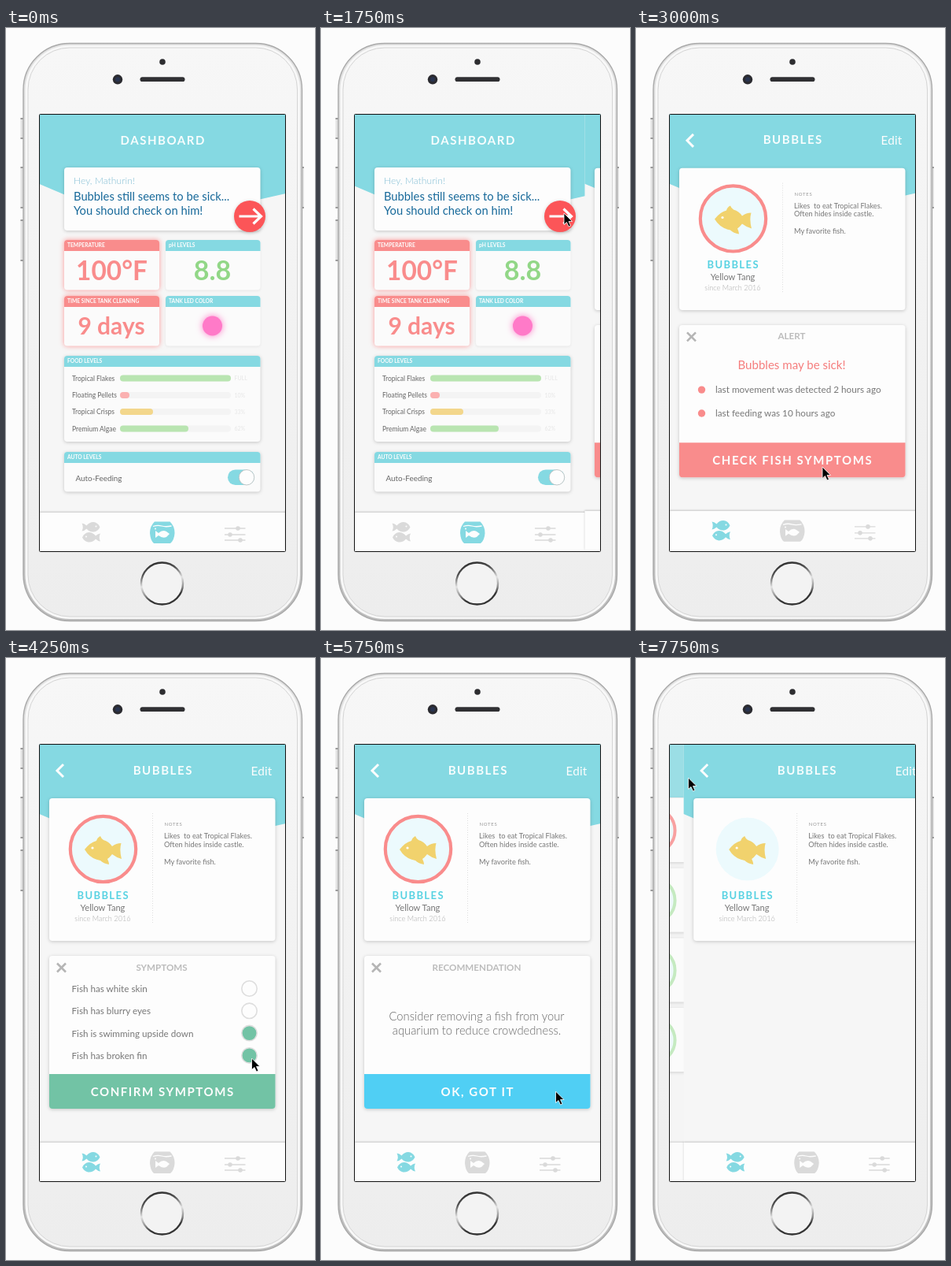
An HTML page that plays this animation: 393x764 px, repeating every 8000 ms.

```html
<!DOCTYPE html>
<html lang="en">
<head>
<meta charset="utf-8">
<title>Aquarium app</title>
<style>
  html, body { margin: 0; width: 100%; height: 100%; overflow: hidden; background: #fcfcfc; }
  svg { display: block; width: 393px; height: 764px; }
  text { font-family: Lato, sans-serif; white-space: pre; }
  .card { filter: drop-shadow(0 1.5px 2px #0003); }
  .soft { filter: drop-shadow(0 1px 1.5px #0001); }
  .alarm { filter: drop-shadow(0 0 3px #ff6b6bb0); }
  .glow { filter: drop-shadow(0 0 4px #ff7ac8); }
</style>
</head>
<body>
<svg id="stage" viewBox="0 0 393 764"></svg>
<script>
const TEAL = '#85d9e2', RED = '#f98c8c', GREEN = '#72c3a5', BLUE = '#50cff4';
const WHITE = '#fdfdfd', PAGE = '#f6f6f6', GREY = '#777';
const LOOP = 8000, STEP = 250, SCREEN_W = 313;

// --- drawing helpers -------------------------------------------------
const rect = (x, y, w, h, fill, extra = '') =>
  `<rect x="${x}" y="${y}" width="${w}" height="${h}" fill="${fill}" ${extra}/>`;
const circle = (x, y, r, fill, extra = '') =>
  `<circle cx="${x}" cy="${y}" r="${r}" fill="${fill}" ${extra}/>`;
const line = (d, color, width, extra = '') =>
  `<path d="${d}" fill="none" stroke="${color}" stroke-width="${width}" ${extra}/>`;
const shape = (d, fill, extra = '') => `<path d="${d}" fill="${fill}" ${extra}/>`;
const group = (content, extra = '') => `<g ${extra}>${content}</g>`;
const label = (x, y, size, str, fill = GREY, weight = 400, spacing = 0, anchor = 'start') =>
  `<text x="${x}" y="${y}" font-size="${size}" fill="${fill}" font-weight="${weight}"
    letter-spacing="${spacing}" text-anchor="${anchor}">${str}</text>`;
const centered = (x, y, size, str, fill, weight, spacing = 0) =>
  label(x + spacing / 2, y, size, str, fill, weight, spacing, 'middle');
const topRounded = (x, y, w, h, fill) =>
  shape(`M${x} ${y + h}v${4 - h}q0-4 4-4h${w - 8}q4 0 4 4v${h - 4}z`, fill);

// --- shared page parts -----------------------------------------------
const WAVE = 'M42.500 109H356V210L170 252L42.500 198z', FLAT = 'M42.500 109H356V177H42.500z';
const pageBase = (title, header = WAVE) =>
  rect(42.5, 109, 314, 556, PAGE) + shape(header, TEAL) +
  centered(199, 147.5, 15, title, '#f7fdfd', 700, 1.55);

function tabs(active) {
  const tint = i => i === active ? TEAL : '#dadada';
  const smallFish = shape('M-11.500-5Q-8-4.500-5.500-2Q-2-6.500 3-6.500Q9-6 11.500 0Q9 5 4 6Q-2 6.500-5.500 2Q-8 4.500-11.500 5Q-9 0-11.500-5z', tint(0)) +
    circle(6.5, -1, 1, WHITE);
  const bowl = shape('M189 626.500H208.500Q214.500 632 214.500 641Q214 650 209 654H188Q183.500 650 183 641Q183 632 189 626.500z', tint(1)) +
    line('M187 632.500Q193 630.500 198 632T210.500 632', WHITE, 1.3) +
    shape('M190 638L194 641Q199 636 204 639L208 642L204 646Q199 648 194 644L190 647z', WHITE) +
    circle(190, 635.5, 1, WHITE);
  const sliders = [[635, 295], [643, 285], [650, 298]].map(([y, x]) =>
    line(`M278 ${y}H304.500`, tint(2), 1.4) + circle(x, y, 2.8, tint(2))).join('');
  return rect(42.5, 615, 314, 50, WHITE, 'style="filter:drop-shadow(0 -1px 1px #0003)"') +
    group(smallFish, 'transform="translate(108 633.500)"') +
    group(smallFish, 'transform="translate(108.500 646.500) scale(-1 1)"') + bowl + sliders;
}

// --- dashboard ---------------------------------------------------------
function tile(x, y, w, h, title, color, kind) {
  return group(rect(x, y, w, h, '#fbfbfb', 'rx="4"') + topRounded(x, y, w, 14, color), `class="${kind}"`) +
    label(x + 4, y + 9.2, 6.7, title, WHITE, 700);
}

function foodBar(name, y, width, color, amount) {
  return label(84, y + 3, 8.5, name, '#666') +
    rect(145, y - 4, 141, 8, '#f4f4f4', 'rx="4"') + rect(145, y - 4, width, 8, color, 'rx="4"') +
    label(290.5, y + 2.5, 7, amount, '#e6e6e6');
}

const dashboard = pageBase('DASHBOARD') +
  rect(74, 177, 249.5, 80, WHITE, 'rx="4" class="card"') +
  label(86, 198, 12, 'Hey, Mathurin!', '#7fbcd3', 300, 0.1) +
  label(86, 218.5, 14.75, 'Bubbles still seems to be sick...', '#17699a') +
  label(86, 236.5, 14.75, 'You should check on him!', '#17699a') +
  circle(310, 239, 20, '#fc5558', 'class="card"') +
  line('M296.500 239H324M314.500 229.500L324.500 239L314.500 248.500', WHITE, 3.2) +
  tile(74, 269, 121, 63.5, 'TEMPERATURE', RED, 'alarm') +
  centered(134.5, 320, 33.4, '100°F', RED, 700) +
  tile(203, 269, 120.5, 63.5, 'pH LEVELS', TEAL, 'soft') +
  centered(262.5, 320, 34, '8.8', '#92d787', 700) +
  tile(74, 340, 121, 63.5, 'TIME SINCE TANK CLEANING', RED, 'alarm') +
  centered(134, 389, 30, '9 days', RED, 700) +
  tile(203, 340, 120.5, 63.5, 'TANK LED COLOR', TEAL, 'soft') +
  circle(262.5, 378, 12.5, '#ff7ac8', 'class="glow"') +
  tile(74, 416, 249.5, 109, 'FOOD LEVELS', TEAL, 'card') +
  foodBar('Tropical Flakes', 444.5, 141, '#b9e5b1', 'FULL') +
  foodBar('Floating Pellets', 466, 12, '#fbb1b1', '10%') +
  foodBar('Tropical Crisps', 487, 42, '#f3d78c', '33%') +
  foodBar('Premium Algae', 508.5, 87, '#b9e5b1', '62%') +
  tile(74, 538, 249.5, 50.5, 'AUTO LEVELS', TEAL, 'card') +
  label(88.5, 575, 9.9, 'Auto-Feeding', '#666') +
  rect(282, 560.5, 34, 19.5, TEAL, 'rx="9.75"') +
  circle(306, 570.3, 9.7, WHITE, 'stroke="#bbb" stroke-width=".8"') +
  tabs(1);

// --- fish profile --------------------------------------------------------
function panel(id, title, content, action, color) {
  return group(
    rect(55, 378, 287.5, 194, WHITE, 'rx="4" class="card"') +
    line('M65 387.500l11 11m0-11l-11 11', '#b5b5b5', 2.6) +
    centered(198, 396.5, 11.6, title, '#bcbcbc', 700) + content +
    shape('M55 528H342.500V568q0 4-4 4H59q-4 0-4-4z', color) +
    centered(198.5, 555.5, 15, action, WHITE, 700, 1.55), `id="${id}"`);
}

const alertBody = centered(198, 434, 15.1, 'Bubbles may be sick!', '#f57d7d') +
  ['last movement was detected 2 hours ago', 'last feeding was 10 hours ago'].map((str, i) =>
    circle(83.5, 460.5 + 30 * i, 4.7, RED) + label(101, 464.5 + 30 * i, 11.75, str)).join('');

const symptomsBody = ['white skin', 'blurry eyes', '', 'broken fin'].map((str, i) => {
  const y = 419.5 + 28.3 * i;
  return label(83.5, y + 4.5, 11.7, str ? 'Fish has ' + str : 'Fish is swimming upside down') +
    circle(309.5, y, 9.7, WHITE, `id="check${i}" stroke="#dedede" stroke-width="1.600"`);
}).join('');

const adviceBody = centered(198, 460, 14.75, 'Consider removing a fish from your', '#666', 300) +
  centered(198, 478, 14.75, 'aquarium to reduce crowdedness.', '#666', 300);

const profile = pageBase('BUBBLES') +
  line('M73 135L65 143L73 151', WHITE, 3) +
  label(311.5, 148.5, 15.3, 'Edit', WHITE, 400, 0.2) +
  rect(55, 178, 287.5, 181, WHITE, 'rx="4" class="card"') +
  circle(123.5, 242.5, 40, '#ecfafd') +
  circle(123.5, 242.5, 41.7, 'none', `id="ring" stroke="${RED}" stroke-width="4.200"`) +
  shape('M100 243Q107 234 115 232Q116 228 120 226Q121 229 124 231Q131 233 135 239Q140 235 146.500 235Q144 244 147 255Q140 253 135 249Q132 253 129 255Q131 259 131 262Q124 261 120 257Q107 255 100 243z', '#f1d26d') +
  circle(110, 241, 1.6, WHITE) +
  centered(123, 305.5, 13, 'BUBBLES', '#57d2e2', 700, 1.4) +
  centered(123, 321, 11.1, 'Yellow Tang', GREY) +
  centered(123, 334, 9.2, 'since March 2016', '#aaa', 300) +
  line('M186.500 197V336', '#ddd', 1, 'stroke-dasharray="1 2"') +
  label(201.5, 213, 6, 'NOTES', '#999', 400, 0.7) +
  ['Likes  to eat Tropical Flakes.', 'Often hides inside castle.', '', 'My favorite fish.'].map((str, i) =>
    label(201, 229 + 11 * i, 9.25, str)).join('') +
  panel('alert', 'ALERT', alertBody, 'CHECK FISH SYMPTOMS', RED) +
  panel('symptoms', 'SYMPTOMS', symptomsBody, 'CONFIRM SYMPTOMS', GREEN) +
  panel('advice', 'RECOMMENDATION', adviceBody, 'OK, GOT IT', BLUE) +
  tabs(0);

// --- fish list -------------------------------------------------------------
const fishList = pageBase('MY FISH', FLAT) +
  [0, 1, 2, 3].map(i => {
    const y = 178 + 88.7 * i;
    return rect(55, y, 287.5, 81, WHITE, 'rx="4" class="card"') +
      circle(109, y + 41, 29, '#ecfafd', `stroke="${i ? '#b9e8b4' : RED}" stroke-width="4"`);
  }).join('') + tabs(0);

// --- phone -------------------------------------------------------------------
const sideButton = (x, y, h) => rect(x, y, 3.5, h, '#e2e2e2', 'rx="1"') +
  rect(x, y, 3.5, 2, '#999') + rect(x, y + h - 2, 3.5, 2, '#999');
const phone = sideButton(18.5, 114, 27) + sideButton(18.5, 176, 53) + sideButton(18.5, 243, 53) + sideButton(375.5, 176, 53) +
  rect(22, 19.5, 354.5, 733, 'url(#edge)', 'rx="59" stroke="#a9a9a9" stroke-width="1.400"') +
  rect(24.5, 22, 349.5, 728, '#f8f8f8', 'rx="56.500"') +
  rect(28, 25, 342.5, 722, 'url(#face)', 'rx="53" stroke="#d4d4d4"') +
  circle(199, 43, 3.8, '#2d2d30') +
  circle(142, 65.3, 6.2, '#2b2b30') + circle(142, 65.3, 3, '#29344f') +
  rect(170.5, 62.3, 57, 5.8, '#303033', 'rx="2.900"') +
  circle(198.5, 705, 26.5, '#f3f3f3', 'stroke="url(#metal)" stroke-width="2.400"');

const stage = document.getElementById('stage');
stage.innerHTML = `<defs>
  <clipPath id="screen">${rect(42.5, 109.5, SCREEN_W, 555, '#000')}</clipPath>
  <linearGradient id="face" x2="0" y2="1"><stop stop-color="#f7f7f7"/><stop offset="1" stop-color="#ededed"/></linearGradient>
  <linearGradient id="edge" x2="0" y2="1"><stop stop-color="#e2e2e2"/><stop offset="1" stop-color="#bdbdbd"/></linearGradient>
  <linearGradient id="metal" x2=".25" y2="1"><stop offset=".1" stop-color="#333"/><stop offset=".3" stop-color="#555"/>
    <stop offset=".55" stop-color="#e4e4e4"/><stop offset=".75" stop-color="#999"/><stop offset=".92" stop-color="#333"/></linearGradient>
  </defs>` + phone +
  group(rect(42, 109, 314, 556, PAGE) + group(dashboard, 'id="dashboard"') +
    group(fishList, 'id="fishList" opacity=".8"') + group(profile, 'id="profile"'), 'clip-path="url(#screen)"') +
  rect(42.5, 109.5, SCREEN_W, 555, 'none', 'stroke="#111" rx="1"') +
  shape('M0 0V14.500L3.500 11.500L6 17L8.500 16L6 10.500H10.500z', '#000', 'id="cursor" stroke="#fff" stroke-width=".8"');

// --- motion ----------------------------------------------------------------------
const set = (id, name, value) => document.getElementById(id).setAttribute(name, value);
const clamp = x => Math.min(1, Math.max(0, x));
const ramp = (t, start, end) => clamp((t - start) / (end - start));
const cubicInOut = x => x < 0.5 ? 4 * x ** 3 : 1 - 4 * (1 - x) ** 3;
const smooth = x => x * x * (3 - 2 * x);

// time, x, y of the pointer tip
const pointerPath = [
  [250, 325, 261], [750, 297, 228], [1250, 309, 235], [2000, 309, 235], [3000, 237, 557],
  [3500, 237, 557], [4000, 312.5, 479], [4250, 312.5, 508], [4750, 298.5, 566],
  [5000, 298.5, 566], [5750, 298.5, 550], [6250, 298.5, 550], [7250, 66.5, 159], [7500, 66.5, 152], [LOOP, 66.5, 152]
];

function pointerAt(t) {
  const next = Math.max(1, pointerPath.findIndex(key => key[0] > t));
  const [t0, x0, y0] = pointerPath[next - 1], [t1, x1, y1] = pointerPath[next];
  const k = smooth(ramp(t, t0, t1));
  return [x0 + (x1 - x0) * k, y0 + (y1 - y0) * k];
}

function draw(t) {
  const push = cubicInOut(ramp(t, 1624, 2124)), pop = cubicInOut(ramp(t, 7628, 8128));
  const shown = push - pop, popping = t >= 7500;
  const back = `translate(${-0.3 * SCREEN_W * shown} 0)`;
  const scale = t < 3250 ? 0.996 : 1;
  set('dashboard', 'transform', back);
  set('fishList', 'transform', back);
  set('dashboard', 'visibility', popping ? 'hidden' : 'visible');
  set('fishList', 'visibility', popping ? 'visible' : 'hidden');
  set('profile', 'transform', `translate(${SCREEN_W * (1 - shown)} ${110 * (1 - scale)}) scale(1 ${scale})`);

  const advice = ramp(t, 4750, 5250), dismissed = ramp(t, 6000, 6500);
  set('alert', 'opacity', t < 3250 ? 1 : 0);
  set('symptoms', 'opacity', t >= 3250 && advice < 1 ? 1 : 0);
  set('advice', 'opacity', advice * (1 - dismissed));
  set('ring', 'opacity', 1 - dismissed);
  set('check2', 'fill', t >= 4000 ? GREEN : WHITE);
  set('check3', 'fill', t >= 4250 ? GREEN : WHITE);

  set('cursor', 'visibility', t < 250 ? 'hidden' : 'visible');
  set('cursor', 'transform', `translate(${pointerAt(t)})`);
}

const start = performance.now();
function tick() {
  const t = (performance.now() - start) % LOOP;
  draw(Math.floor(t / STEP) * STEP);
  requestAnimationFrame(tick);
}
tick();
</script>
</body>
</html>
```
